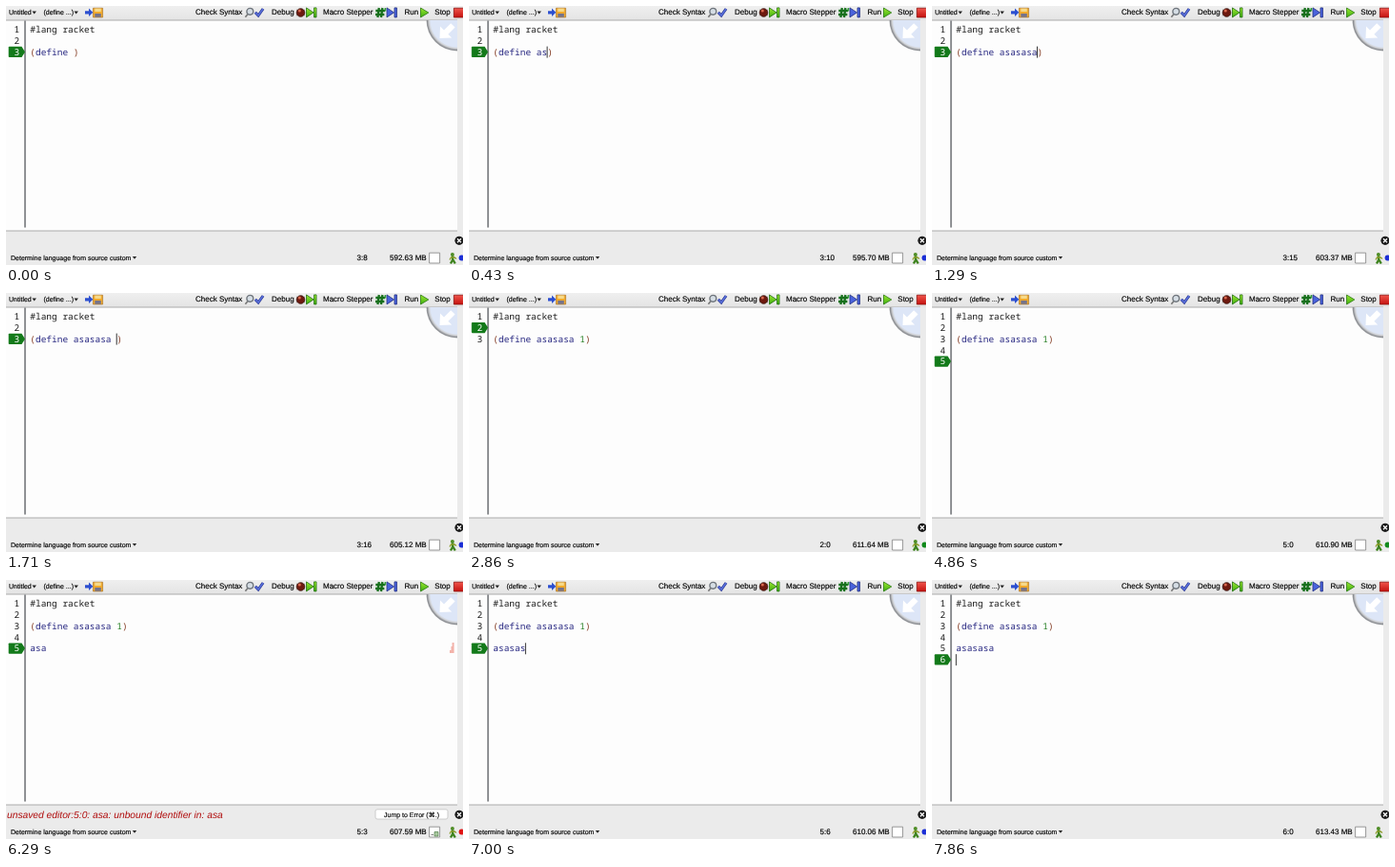
Animation of 480 by 273 pixels, one loop 8000 ms. Source, as an HTML page:

```html
<!DOCTYPE html>
<html lang="en">
<head>
<meta charset="utf-8">
<title>Editor session</title>
<style>
  html, body { margin: 0; width: 100%; height: 100%; overflow: hidden; background: #ebebeb; }
  svg { display: block; width: 480px; height: 273px; }
  text { font: 8px "Liberation Sans", Arial, sans-serif; text-rendering: geometricPrecision; white-space: pre; fill: #000; stroke: #000; stroke-width: .16px; }
  .small { font-size: 7px; }
  .code, .num { font: 9.47px "Noto Sans Mono", "DejaVu Sans Mono", monospace; fill: #1c1c1c; stroke: none; }
  .num { text-anchor: middle; }
  .paren { fill: #843c24; }
  .word { fill: #262680; }
  .digit { fill: #298026; }
  .error { font-size: 10.25px; font-style: italic; fill: #b00c0c; stroke: none; }
</style>
</head>
<body>
<svg viewBox="0 0 480 273">
  <defs>
    <linearGradient id="bar" x2="0" y2="1">
      <stop stop-color="#efefef"/><stop offset="1" stop-color="#e4e4e4"/>
    </linearGradient>
    <linearGradient id="red" x2="0" y2="1">
      <stop stop-color="#f0554c"/><stop offset="1" stop-color="#c4120f"/>
    </linearGradient>
    <linearGradient id="green" x2="0" y2="1">
      <stop stop-color="#9be82f"/><stop offset="1" stop-color="#3fae12"/>
    </linearGradient>
    <radialGradient id="corner" gradientUnits="userSpaceOnUse" cx="474" cy="15" r="32.5">
      <stop offset=".86" stop-color="#dde6f7"/><stop offset=".91" stop-color="#d2d4d8"/>
      <stop offset=".97" stop-color="#8c8e92"/><stop offset="1" stop-color="#a4a6aa"/>
    </radialGradient>
    <clipPath id="page"><path d="M0 15H474V237H0Z"/></clipPath>
    <path id="step" d="M0 1.5L7.5 6.5L0 11.5ZM8 1.5H10.5V11.5H8Z"/>
    <path id="drop" d="M0 0H4.4L2.2 2.8Z" fill="#222"/>
  </defs>

  <path fill="url(#bar)" d="M0 0H480V15H0Z"/>
  <path fill="#fdfdfd" d="M0 15H474V237H0Z"/>
  <path fill="none" stroke="#aaa" d="M0 15H474M474 237H0"/>
  <path stroke="#55585c" stroke-width="1.3" d="M20 15.5V233.5"/>

  <!-- toolbar -->
  <text class="small" x="3" y="9">Untitled</text><use href="#drop" x="27.5" y="5.6"/>
  <text class="small" x="39.5" y="9">(define ...)</text><use href="#drop" x="71.5" y="5.6"/>
  <path fill="#2c4fd0" d="M83 5.2H87V2.5L91.3 6.8L87 11V8.4H83Z"/>
  <path fill="#f0a92c" stroke="#a06a20" stroke-width=".6" d="M91.5 2.2H101.6V12H91.5Z"/>
  <path fill="#f6d98a" d="M93.3 2.6H99.8V6H93.3Z"/>
  <path fill="#75748c" d="M93.3 8H99.8V11.7H93.3Z"/>

  <text x="199" y="9.4">Check Syntax</text>
  <path stroke="#777" stroke-width="1.6" d="M253.8 8.8L251.4 11.8"/>
  <circle cx="256.3" cy="5.8" r="3.4" fill="#d5dde4" stroke="#6f757c" stroke-width="1.4"/>
  <path fill="none" stroke="#26348f" stroke-width="3" d="M261.8 6.7L265 10L270 3"/>
  <path fill="none" stroke="#5a70dc" stroke-width="1.6" d="M261.8 6.7L265 10L270 3"/>

  <text x="279" y="9.4">Debug</text>
  <path stroke="#321" stroke-width=".6" d="M305.3 4L313.7 10M305.3 10L313.7 4"/>
  <circle cx="309.5" cy="7" r="4.3" fill="#6e1a10" stroke="#35100a" stroke-width=".8"/>
  <circle cx="308.3" cy="5" r="1.5" fill="#d9694f"/>
  <use href="#step" x="315.5" y=".4" fill="url(#green)" stroke="#216e10" stroke-width=".8"/>

  <text x="333" y="9.4">Macro Stepper</text>
  <path stroke="#17701c" stroke-width="2.3" d="M391.8 2L390.4 12M395.4 2L394 12M388.3 5H398M388 9H397.4"/>
  <path stroke="#34a03b" stroke-width="1.6" d="M398.4 2V5.5"/>
  <use href="#step" x="400" y=".4" fill="#4a63dc" stroke="#223080" stroke-width=".8"/>

  <text x="418.5" y="9.4">Run</text>
  <path fill="url(#green)" stroke="#2b7a14" stroke-width=".8" d="M435.5 2L443.8 7L435.5 12Z"/>
  <text x="450.3" y="9.4">Stop</text>
  <path fill="url(#red)" stroke="#8c1210" stroke-width=".8" d="M470.4 2.2H481V12H470.4Z"/>

  <!-- corner tab -->
  <g clip-path="url(#page)">
    <circle cx="474" cy="15" r="32.5" fill="url(#corner)"/>
    <path fill="#fff" d="M455.5 34L456 21.5L460 25.4L467.2 18.2L471.6 22.6L464.4 29.8L468.2 33.5Z"/>
  </g>

  <!-- editor -->
  <path id="mark" fill="#fff56e" fill-opacity=".85" d="M25.2 42.5H128V54.5H25.2Z"/>
  <path id="tag" fill="#137a1a" d="M3.5 .2H16.5L20 5.8L16.5 11.4H3.5Q2.7 11.4 2.7 10.6V1Q2.7 .2 3.5 .2Z"/>
  <g id="lines"></g>
  <path id="caret" stroke="#333" d="M0 0V12"/>

  <!-- status -->
  <g id="fail">
    <path fill="#f3b3aa" d="M468.6 66H470.6V77H466V74H467.5V70H468.6Z"/>
    <text class="error" x="1" y="250.7">unsaved editor:5:0: asa: unbound identifier in: asa</text>
    <rect x="388" y="241.8" width="76" height="10.2" rx="2" fill="#fff" stroke="#c2c2c2" stroke-width=".8"/>
    <text class="small" x="426" y="249.5" text-anchor="middle">Jump to Error (⌘.)</text>
  </g>
  <circle cx="476" cy="247.3" r="4.6" fill="#1b1b1b"/>
  <path stroke="#fff" stroke-width="1.3" d="M474 245.3L478 249.3M478 245.3L474 249.3"/>
  <text class="small" x="5" y="267.5">Determine language from source custom</text><use href="#drop" x="132.8" y="264"/>
  <text id="pos" x="368.5" y="268"></text>
  <text id="mem" x="403" y="268"></text>
  <path fill="#fff" stroke="#808080" stroke-width=".8" d="M444.6 260.2H455.6V271H444.6Z"/>
  <g id="sweep">
    <path fill="#a9c9a0" stroke="#4f7d48" stroke-width=".7" d="M450 265.5H454V270H450Z"/>
    <path stroke="#666" stroke-width=".8" d="M446.5 268.5H449"/>
  </g>
  <circle cx="468.9" cy="262" r="2" fill="#4f8d26"/>
  <path fill="none" stroke="#3f8420" stroke-width="2.4" d="M469.2 263.5V267.5L467 271.5M469.2 267L471.8 271.5"/>
  <path fill="none" stroke="#8a9a24" stroke-width="1.3" d="M466 267.5L467.5 265L471 265L473 266.5"/>
  <circle id="dot" cx="478.6" cy="265.5" r="3"/>
</svg>

<script>
const LOOP = 8000, CHAR = 5.682, LEFT = 25.3, TOP = 42.6 - 2 * 11.85, PITCH = 11.85;
const BLUE = '#1c2fd6', GREEN = '#128a1c', RED = '#e01414', NONE = 'none';
const NAME = 'asasasa', DEF = `(define ${NAME} 1)`;
const $ = id => document.getElementById(id);

// time, text after the header, caret row, caret column, memory, dot
const steps = [[-300, '(define )', 3, 8, 592.63, BLUE]];
const add = (...step) => steps.push(step);
[290, 430, 570, 710, 860, 1000, 1140].forEach((t, i) =>
  add(t, `(define ${NAME.slice(0, i + 1)})`, 3, 9 + i, 592.63 + (i + 1) * 10.74 / 7, BLUE));
add(1570, `(define ${NAME} )`, 3, 16, 605.12, BLUE);
add(1860, DEF, 3, 17, 606.85, BLUE);
add(2290, DEF, 3, 17, 611.64, GREEN);
add(2570, DEF, 2, 0, 611.64, GREEN);
add(3290, DEF, 3, 18, 611.64, GREEN);
add(3570, DEF, 3, 18, 605.55, GREEN);
add(4430, DEF + '\n', 4, 0, 609.31, GREEN);
add(4570, DEF + '\n\n', 5, 0, 610.9, GREEN);
[5000, 5140, 5290].forEach((t, i) =>
  add(t, `${DEF}\n\n${NAME.slice(0, i + 1)}`, 5, i + 1, 612.4 + i * 1.53, BLUE));
add(6000, DEF + '\n\nasa', 5, 3, 607.59, RED);
[6710, 6860, 7000, 7140].forEach((t, i) =>
  add(t, `${DEF}\n\n${NAME.slice(0, i + 4)}`, 5, i + 4, 608.2 + i * .93, BLUE));
add(7430, `${DEF}\n\n${NAME}`, 5, 7, 612.08, GREEN);
add(7710, `${DEF}\n\n${NAME}\n`, 6, 0, 613.43, NONE);

const kind = token => /[()]/.test(token) ? 'paren' : /\d/.test(token) ? 'digit' : 'word';
const paint = line => line.replace(/[()]|\w+/g, s => `<tspan class="${kind(s)}">${s}</tspan>`);
const rowTop = row => TOP + (row - 1) * PITCH;

function drawLines(text, current) {
  const rows = ['#lang racket', '', ...text.split('\n')];
  $('lines').innerHTML = rows.map((line, i) => {
    const y = rowTop(i + 1) + 9.1;
    const fill = i + 1 === current ? ' style="fill:#fff"' : '';
    return `<text class="num" x="11.3" y="${y}"${fill}>${i + 1}</text>` +
      `<text class="code" x="${LEFT}" y="${y}">${i ? paint(line) : line}</text>`;
  }).join('');
}

const show = (id, on) => $(id).style.display = on ? '' : 'none';

let shown;
function draw(t) {
  const step = steps.findLast(s => s[0] <= t);
  const [start, text, row, col, mem, dot] = step;
  show('caret', (t - start) % 1000 < 250);
  if (step === shown) return;
  shown = step;
  drawLines(text, row);
  $('tag').setAttribute('transform', `translate(0 ${rowTop(row)})`);
  $('caret').setAttribute('transform', `translate(${LEFT + col * CHAR} ${rowTop(row)})`);
  $('pos').textContent = `${row}:${col}`;
  $('mem').textContent = mem.toFixed(2) + ' MB';
  $('dot').setAttribute('fill', dot);
  show('mark', row === 3 && col === 18);
  show('fail', dot === RED);
  show('sweep', dot === RED);
}

const begin = performance.now();
function tick() {
  draw((performance.now() - begin) % LOOP);
  requestAnimationFrame(tick);
}
tick();
</script>
</body>
</html>
```
